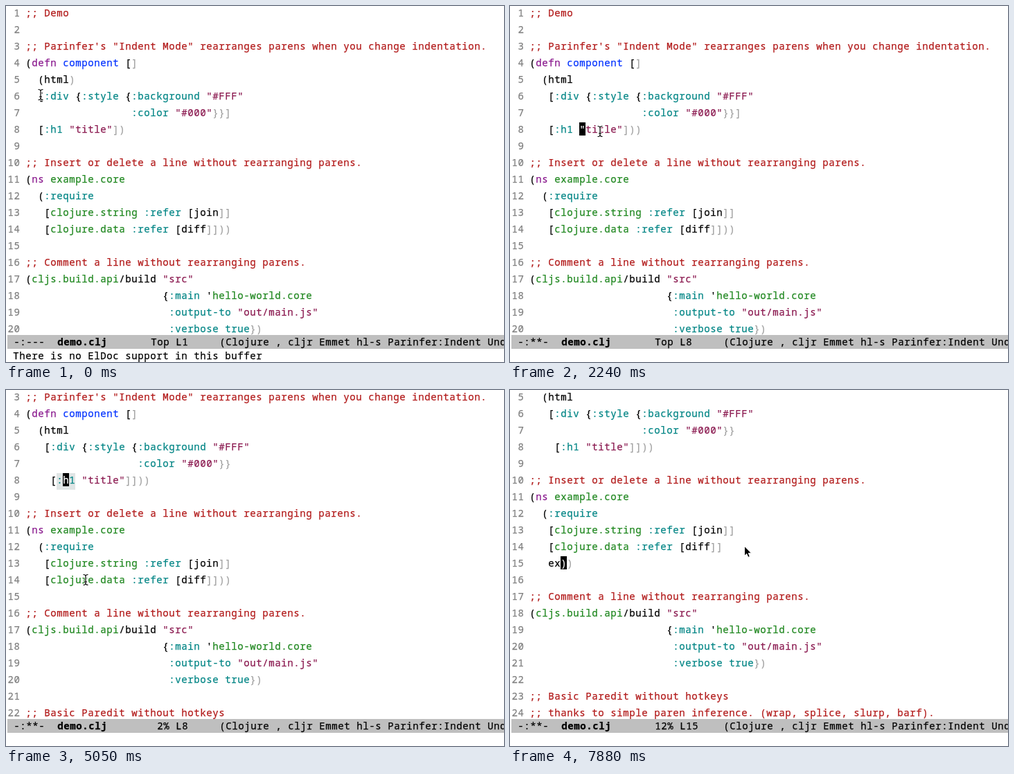
These frames come from a looping animation (719x514 px, 8 s). An HTML page:

```html
<!DOCTYPE html>
<html lang="en">
<head>
<meta charset="utf-8">
<title>Parinfer demo</title>
<style>
  html, body { margin: 0; width: 100%; height: 100%; overflow: hidden; background: #fff; }
  #stage {
    position: relative; width: 719px; height: 514px; overflow: hidden; color: #000;
    font: 14px/19px "Noto Sans Mono", "DejaVu Sans Mono", monospace;
    letter-spacing: calc(9px - 1ch);
    font-variant-ligatures: none;
    -webkit-text-stroke: .25px;
  }
  #stage div, #stage svg { position: absolute; white-space: pre; }
  .num { left: 2px; width: 18.6px; text-align: right; color: #7f7f7f; }
  .code { left: 28.3px; }
  .comment { color: #b21a1a; }
  .string { color: #8b1a50; }
  .const { color: #008585; }
  .keyword { color: #8a1a8e; }
  .func { color: #0433ff; }
  .type { color: #1f871f; }
  .dim { color: #a0a0a0; }
  .sel { background: #b3d7ff; }
  .hl { background: #e0e5e5; }
  .match { background: #40e0d0; }
  .cursor { background: #000; color: #fff; text-indent: .3px; }
  #mode { left: 2px; top: 475px; width: 717px; height: 20px; background: #bfbfbf; text-indent: .3px; overflow: hidden; }
  #echo { left: 10.3px; top: 495px; }
  #beam, #arrow { left: 0; top: 0; overflow: visible; }
</style>
</head>
<body>
<div id="stage">
  <div id="text"></div>
  <div id="mode"></div>
  <div id="echo"></div>
  <svg id="beam" width="1" height="1" fill="none">
    <defs>
      <path id="bar" d="M-3.5-7.5Q0-7.5 0-5Q0-7.5 3.5-7.5M0-5V5M-3.5 7.5Q0 7.5 0 5Q0 7.5 3.5 7.5M-2 3H2"/>
    </defs>
    <use href="#bar" stroke="#fff" stroke-width="3"/>
    <use href="#bar" stroke="#000" stroke-width="1.2"/>
  </svg>
  <svg id="arrow" width="1" height="1">
    <path d="M.5.5V14.5L3.7 11.5L5.8 16.5L8.3 15.4L6.2 10.7H10.5Z" fill="#000" stroke="#fff"/>
  </svg>
</div>
<script>
const LOOP = 8000, CELL = 9, ROW = 24, LEFT = 28, RIGHT = 712;
const $ = id => document.getElementById(id);
const pad = n => ' '.repeat(n);

const source = [
  ';; Demo',
  '',
  ';; Parinfer\'s "Indent Mode" rearranges parens when you change indentation.',
  '(defn component []',
  '  (html)',
  '  [:div {:style {:background "#FFF"',
  pad(17) + ':color "#000"}}]',
  '  [:h1 "title"])',
  '',
  ';; Insert or delete a line without rearranging parens.',
  '(ns example.core',
  '  (:require',
  '   [clojure.string :refer [join]]',
  '   [clojure.data :refer [diff]]))',
  '',
  ';; Comment a line without rearranging parens.',
  '(cljs.build.api/build "src"',
  pad(22) + "{:main 'hello-world.core",
  pad(23) + ':output-to "out/main.js"',
  pad(23) + ':verbose true})',
  '',
  ';; Basic Paredit without hotkeys',
  ';; thanks to simple paren inference. (wrap, splice, slurp, barf).',
  '(defn foo [a b]'
];

// Line edits; line numbers count from 1.
const put = (l, n, s) => { l[n - 1] = s; };
const indent = (l, a, b) => { for (let n = a; n <= b; n++) put(l, n, ' ' + l[n - 1]); };
const chop = (l, n, k) => put(l, n, l[n - 1].slice(0, -k));
const type = (s, pt) => ({ pt: [15, pt], edit: l => put(l, 15, s) });

const move = (x, y) => ({ mouse: [x, y] });
const drag = (x, y, more) => ({
  mouse: [x, y],
  pt: [Math.floor(y / ROW) + 1, Math.floor((x - LEFT) / CELL)],
  ...more
});

// Each step is [time, changes to the state before it].
const steps = [
  [0, { top: 1, pt: [1, 0], cursor: false, mark: null, hl: null, match: [], arrow: false,
        pos: 'Top', flag: '--', echo: 'There is no ElDoc support in this buffer', mouse: [50, 128] }],
  [150, drag(50, 128, { cursor: true, echo: '' })],
  [300, drag(52, 136, { mark: [6, 2] })],
  [450, drag(57, 147)],
  [600, drag(68, 157)],
  [750, drag(82, 167)],
  [900, drag(93, 174)],
  [1050, drag(98, 176, { echo: 'Mark set' })],
  [1340, { mark: [6, 0] }],
  [1490, { pt: [8, 8], flag: '**', edit: l => indent(l, 6, 8) }],
  [1790, { mark: null, echo: '', mouse: [212, 178],
           edit: l => { chop(l, 5, 1); l[7] += ')'; } }],
  [2090, move(182, 180)],
  [2240, move(130, 181)],
  [2390, drag(58, 180)],
  [2540, drag(62, 180, { mark: [8, 3] })],
  [2680, drag(72, 181)],
  [2830, drag(78, 181, { echo: 'Mark set' })],
  [3130, { mark: [8, 0] }],
  [3280, { pt: [8, 6], hl: [8, 5, 8], edit: l => indent(l, 8, 8) }],
  [3580, { mark: null, echo: '',
           edit: l => { chop(l, 7, 1); put(l, 8, '    [:h1 "title"]]))'); } }],
  [4170, move(84, 194)],
  [4320, move(98, 228)],
  [4460, move(110, 260)],
  [4610, move(115, 274)],
  [5050, { top: 3, pos: ' 2%' }],
  [5200, { top: 4, pos: '11%' }],
  [5340, { top: 5, pos: '13%' }],
  [5790, move(140, 268)],
  [5940, move(215, 252)],
  [6090, move(290, 238)],
  [6230, move(330, 232)],
  [6380, { mouse: [341, 233], pt: [14, 33], hl: null }],
  [6530, { mouse: [338, 225], arrow: true, match: [[11, 0], [14, 32]] }],
  [6830, { pt: [15, 0], edit: l => l.splice(14, 0, '') }],
  [6980, { match: [] }],
  [7130, type(' ', 1)],
  [7280, type('  ', 2)],
  [7430, type('   ', 3)],
  [7730, { pt: [15, 4], pos: '12%', edit: l => { chop(l, 14, 2); put(l, 15, '   e))'); } }],
  [7880, type('   ex))', 5)]
];

let last = { lines: source };
const states = steps.map(([time, change]) => {
  last = { ...last, ...change, time, lines: [...last.lines] };
  if (change.edit) change.edit(last.lines);
  return last;
});

const token = /(;;.*)|("[^"]*")|(:[\w-]+|\btrue\b)|(\b(?:defn|ns)\b)|(\b(?:component|foo)\b)|([\w-]+(?:\.[\w-]+)+)|([\])}]+$)/g;
const faces = ['comment', 'string', 'const', 'keyword', 'func', 'type', 'dim'];

function span(face, text) {
  const el = document.createElement('span');
  el.className = face;
  el.textContent = text;
  return el;
}

function colour(line) {
  const out = [];
  let at = 0;
  for (const m of line.matchAll(token)) {
    out.push(line.slice(at, m.index), span(faces[m.slice(1).findIndex(Boolean)], m[0]));
    at = m.index + m[0].length;
  }
  return [...out, line.slice(at)];
}

function draw(s) {
  const text = $('text');
  text.replaceChildren();
  const add = (face, n, css, ...kids) => {
    const el = document.createElement('div');
    el.className = face;
    el.style.top = (n - s.top) * ROW + 'px';
    Object.assign(el.style, css);
    el.append(...kids);
    text.append(el);
  };
  const fill = (face, n, a, b, height = ROW, ch = '') => {
    const x = LEFT + a * CELL;
    const end = b === null ? RIGHT : LEFT + b * CELL;
    add(face, n, { left: x + 'px', width: end - x + 'px', height: height + 'px' }, ch);
  };

  if (s.hl) fill('hl', ...s.hl);
  if (s.mark) {
    const [a, b] = [s.mark, s.pt];
    for (let n = a[0]; n <= b[0]; n++)
      fill('sel', n, n === a[0] ? a[1] : 0, n === b[0] ? b[1] : null);
  }
  for (const [n, c] of s.match) fill('match', n, c, c + 1);

  for (let n = s.top; n < s.top + 20; n++) {
    add('num', n, {}, String(n));
    add('code', n, {}, ...colour(s.lines[n - 1] || ''));
  }
  if (s.cursor) {
    const [n, c] = s.pt;
    const ch = s.lines[n - 1][c] || '';
    fill('cursor', n, c, c + 1, ch ? 19 : ROW, ch);
  }

  const name = document.createElement('b');
  name.textContent = 'demo.clj';
  $('mode').replaceChildren(` -:${s.flag}-  `, name,
    pad(7) + `${s.pos} L${s.pt[0]}`.padEnd(11) + '(Clojure , cljr Emmet hl-s Parinfer:Indent Undo');
  $('echo').textContent = s.echo;

  const [x, y] = s.mouse;
  for (const id of ['beam', 'arrow']) {
    $(id).style.transform = `translate(${x}px, ${y}px)`;
    $(id).style.display = (id === 'arrow') === s.arrow ? 'block' : 'none';
  }
}

let shown = null;
const start = performance.now();
function tick() {
  const t = (performance.now() - start) % LOOP;
  const s = states.findLast(x => x.time <= t) || states[0];
  if (s !== shown) draw(shown = s);
  requestAnimationFrame(tick);
}
tick();
</script>
</body>
</html>
```
